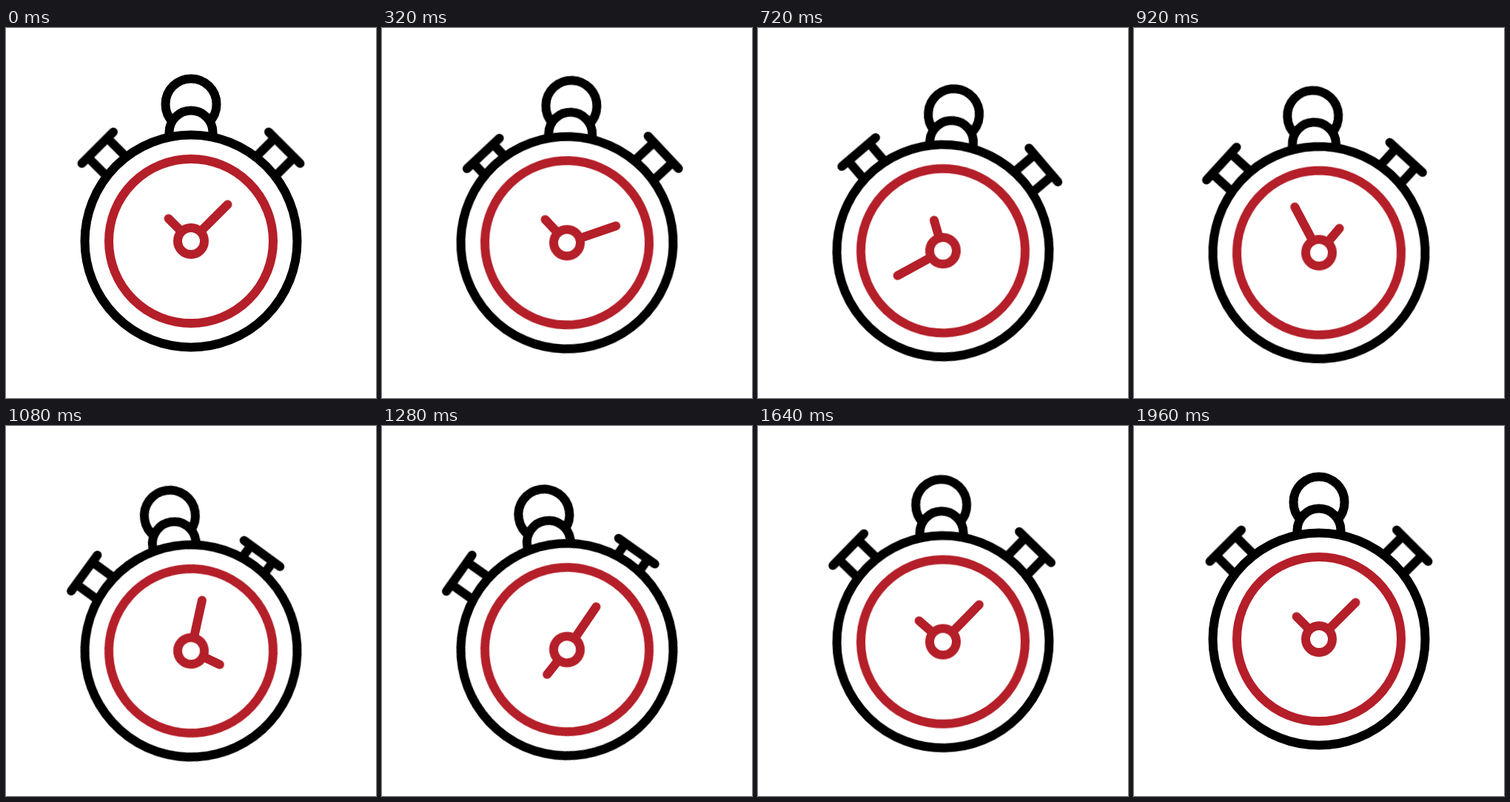
An HTML page for the animation above (2000 ms loop, 500x500 px).

```html
<!DOCTYPE html>
<html lang="en">
<head>
<meta charset="utf-8">
<title>Stopwatch</title>
<style>
  html, body { margin: 0; width: 100%; height: 100%; overflow: hidden; background: #fff; }
  svg { display: block; width: 100%; height: 100%; }
  svg * { transform-origin: 0 0; transform-box: view-box; }

  .ink { fill: none; stroke: #000; stroke-width: 12; stroke-linecap: round; }
  .red { stroke: #b41f29; }
  .solid { fill: #fff; }

  .bob, .swing, .press, .hand {
    animation: 2s cubic-bezier(.5, 0, .5, 1) infinite;
  }
  .bob { animation-name: bob; }
  .swing { animation-name: swing; }
  .left { animation-name: press-left; }
  .right { animation-name: press-right; }
  .long { animation-name: turn-long; }
  .short { animation-name: turn-short; }

  @keyframes bob {
    0%, 2%, 98%, 100% { transform: translateY(0); }
    52% { transform: translateY(16px); }
  }
  @keyframes swing {
    0%, 4%, 88%, 100% { transform: rotate(0deg); }
    32% { transform: rotate(5deg); }
    60% { transform: rotate(-10deg); }
  }
  @keyframes press-left {
    0%, 4%, 42%, 100% { transform: translateY(0); }
    23% { transform: translateY(17.4px); }
  }
  @keyframes press-right {
    0%, 39%, 79%, 100% { transform: translateY(0); }
    59% { transform: translateY(17.4px); }
  }
  @keyframes turn-long {
    0%, 3% { transform: rotate(45deg); }
    67%, 100% { transform: rotate(405deg); }
  }
  @keyframes turn-short {
    0%, 23% { transform: rotate(-45deg); }
    87%, 100% { transform: rotate(315deg); }
  }
</style>
</head>
<body>
<!-- The origin is the centre of the dial at rest -->
<svg viewBox="-250 -288 500 500">
  <defs>
    <path id="button" d="M-30-178.5H30M-18.5-178.5V-135M18.5-178.5V-135"/>
  </defs>
  <g class="bob">
    <g class="swing ink">
      <circle cy="-185" r="34.5"/>
      <path class="solid" d="M-29.5-138V-147A29.5 29.5 0 0 1 29.5-147V-138"/>
      <g transform="rotate(-45)"><use class="press left" href="#button"/></g>
      <g transform="rotate(45)"><use class="press right" href="#button"/></g>
      <circle class="solid" r="143.5"/>
      <g class="red">
        <circle r="111"/>
        <path class="hand long" d="M0-20V-70"/>
        <path class="hand short" d="M0-20V-43"/>
        <circle class="solid" r="18"/>
      </g>
    </g>
  </g>
</svg>
</body>
</html>
```
